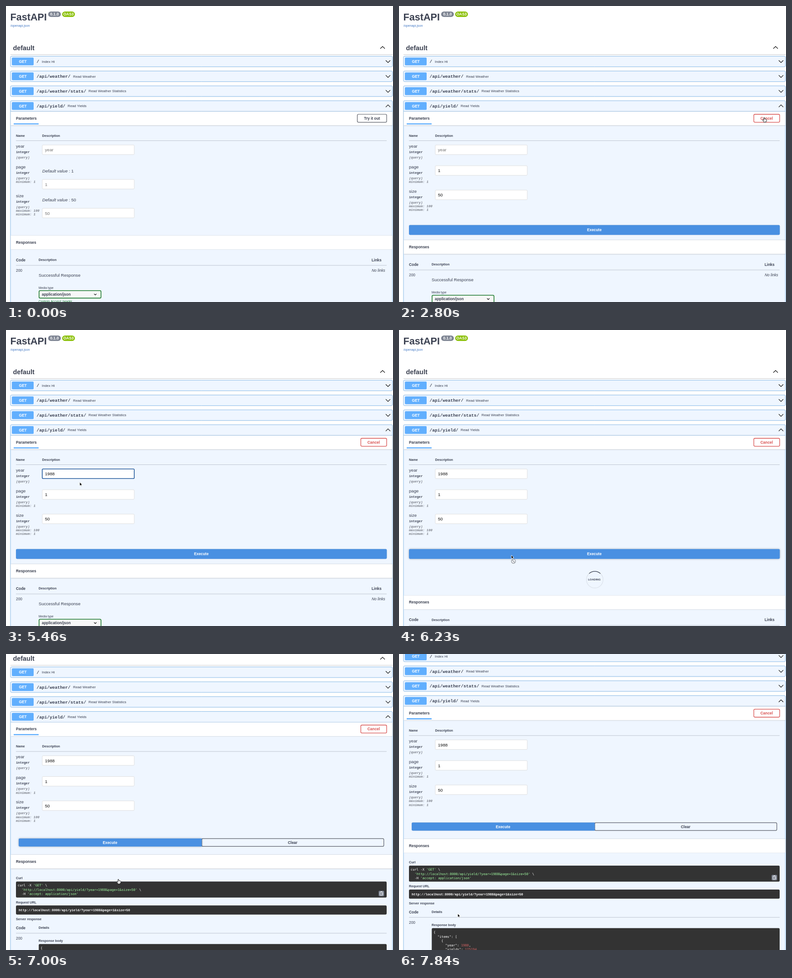
Recreate the animation shown at these times as an HTML page with a canvas. Size 854x656 px, loop 8 s.

```html
<!DOCTYPE html>
<html lang="en">
<head>
<meta charset="utf-8">
<title>API docs</title>
<style>
html, body { margin: 0; width: 100%; height: 100%; overflow: hidden; background: #fff; }
canvas { display: block; }
</style>
</head>
<body>
<canvas id="stage" width="854" height="656"></canvas>
<script>
const ctx = document.getElementById('stage').getContext('2d');
const LOOP = 8000, STEP = 70;
const INK = '#3b4151', BLUE = '#61affe', PANEL = '#eff6ff', DARK = '#333', GREEN = '#a2fca2';
const SANS = '"Liberation Sans", Arial, sans-serif';
const COURIER = '"Liberation Mono", "Courier New", monospace';
const CODE = '"DejaVu Sans Mono", Menlo, monospace';

// Moments at which the page changes
const TRY = 2520, FOCUS = 3710, LOADING = 6160, ANSWER = 6510;
const TYPED = [4270, 4480, 4620, 4970];
const CLICKS = [[1260, 1400], [2450, 2590], [3640, 3780], [6090, 6230]];

const SCROLL = [[6720, 0], [6790, .7], [6860, 22], [6930, 55], [7000, 82.5], [7070, 97],
  [7140, 106], [7280, 113.5], [7420, 116.5], [7560, 117.7]];
const POINTER = [[280, 420, 646], [420, 372, 470], [560, 318, 310], [700, 285, 226], [840, 276, 210],
  [1470, 276, 210], [1610, 360, 215], [1820, 591, 233.5], [2030, 770, 255], [2310, 806, 247],
  [3150, 806, 247], [3290, 690, 272], [3430, 400, 322], [3570, 190, 325], [3700, 149, 316],
  [5390, 149, 316], [5600, 190, 380], [5810, 238, 480], [6020, 248, 499],
  [7140, 248, 499], [7280, 210, 530], [7420, 150, 570], [7560, 131, 577], [7840, 129.5, 575.5]];
const SHAPES = [[0, 'none'], [280, 'arrow'], [770, 'hand'], [1900, 'arrow'], [2100, 'hand'],
  [3220, 'arrow'], [3570, 'beam'], [4200, 'none'], [5460, 'arrow'], [5880, 'hand'],
  [LOADING, 'ban'], [ANSWER, 'hand'], [7210, 'arrow']];

const between = (t, a, b) => t >= a && t < b;

function tween(keys, t) {
  const i = keys.findIndex(k => k[0] > t);
  if (i === 0) return keys[0].slice(1);
  if (i < 0) return keys[keys.length - 1].slice(1);
  const a = keys[i - 1], b = keys[i], p = (t - a[0]) / (b[0] - a[0]);
  return a.slice(1).map((v, j) => v + (b[j + 1] - v) * p);
}

// y is the middle of the capitals
function text(s, x, y, size = 8.4, { color = INK, style = '', family = SANS, align = 'left' } = {}) {
  ctx.font = `${style} ${size}px ${family}`;
  ctx.fillStyle = color;
  ctx.textAlign = align;
  ctx.fillText(s, x, y + size * .35);
}
const bold = (s, x, y, size, color, align) => text(s, x, y, size, { style: 'bold', color, align });
const courier = (s, x, y, size, color, style = 'bold') =>
  text(s, x, y, size, { style, color, family: COURIER });

function code(parts, x, y) {
  for (const [s, color] of parts) {
    text(s, x, y, 7.2, { color, family: CODE });
    x += ctx.measureText(s).width;
  }
}

function box(x, y, x2, y2, fill, stroke, width = 1, radius = 2, shadow = 0) {
  ctx.save();
  ctx.beginPath();
  ctx.roundRect(x, y, x2 - x, y2 - y, radius);
  ctx.shadowColor = 'rgba(0,0,0,.28)';
  ctx.shadowBlur = shadow;
  if (fill) { ctx.fillStyle = fill; ctx.fill(); }
  ctx.shadowBlur = 0;
  if (stroke) { ctx.strokeStyle = stroke; ctx.lineWidth = width; ctx.stroke(); }
  ctx.restore();
}

function path(points, stroke, width = 1, fill) {
  ctx.beginPath();
  points.forEach(([x, y]) => ctx.lineTo(x, y));
  if (fill) { ctx.closePath(); ctx.fillStyle = fill; ctx.fill(); }
  ctx.strokeStyle = stroke;
  ctx.lineWidth = width;
  ctx.stroke();
}

const rule = (y, x = 22, x2 = 840) => path([[x, y], [x2, y]], 'rgba(59,65,81,.35)', .8);
const chevron = (x, y, dir) => path([[x - 5, y - 2.5 * dir], [x, y + 2.5 * dir], [x + 5, y - 2.5 * dir]], '#111', 1.2);

function band(y, label) {
  box(10.5, y, 852.5, y + 30.5, '#fff', null, 0, 0, 2);
  bold(label, 22, y + 15);
}

function clipboard(x, y, h) {
  box(x, y, x + 12, y + h, '#7d8492', null, 0, 2);
  const m = y + h / 2;
  box(x + 3, m - 3.5, x + 9, m + 4, null, '#fff', .9, 1);
  box(x + 4.5, m - 4.5, x + 7.5, m - 2.5, '#fff', null, 0, .5);
  path([[x + 10, m + 1], [x + 5.5, m + 1], [x + 7, m - .5]], '#fff', .8);
}

function header() {
  bold('FastAPI', 9.5, 24, 21.6);
  box(93, 12.3, 121, 24.3, '#7d8492', null, 0, 6);
  bold('0.1.0', 107, 18.3, 8.6, '#fff', 'center');
  box(124, 12.3, 152, 24.3, '#89bf04', null, 0, 6);
  bold('OAS3', 138, 18.3, 8.4, '#fff', 'center');
  text('/openapi.json', 9.7, 43.3, 7.2, { color: '#4278c4' });
  bold('default', 15.5, 92.7, 14.4);
  chevron(831, 92, -1);
  rule(107.5, 10, 853);
}

function routes(t) {
  [['/', 'Index Hi', 79], ['/api/weather/', 'Read Weather', 148],
   ['/api/weather/stats/', 'Read Weather Statistics', 182], ['/api/yield/', 'Read Yields', 136]
  ].forEach(([url, label, x], i) => {
    const y = 111.3 + i * 32.9, open = i === 3, copy = open && between(t, 1540, 1890);
    box(10, y, 852.7, open ? 1000 : y + 23.3, PANEL, '#85bdf0', .9, 2.4, 2);
    box(13, y + 3, 61, y + 20.3, BLUE, null, 0, 2);
    bold('GET', 37, y + 11.7, 8.4, '#fff', 'center');
    courier(url, 67.5, y + 11.7, 9.6);
    text(label, x, y + 11.6, 7.8);
    chevron(copy ? 826 : 843, y + 11.7, open ? -1 : 1);
    if (copy) clipboard(835, y + 3, 15);
  });
}

function field(y, value, muted, focused) {
  box(80, y, 283, y + 21.3, '#fff', focused ? '#245a9c' : '#d9d9d9', focused ? 1.6 : .8);
  text(value, 86, y + 11, 9.6, { color: muted ? '#757575' : '#111' });
}

function param(name, y, limits) {
  text(name, 22, y - .5, 9.6);
  courier('integer', 22, y + 12.4, 7.2);
  ['(query)', ...limits].forEach((s, i) =>
    courier(s, 22, y + 24 + (i ? .2 + i * 8.3 : 0), 7.2, '#7b7f87', 'italic bold'));
}

function fallback(y, value) {
  text('Default value', 80, y, 9.6, { style: 'italic' });
  text(' : ' + value, 136, y, 9.6);
}

function parameters(t) {
  const edit = t >= TRY;
  path([[10, 233.8], [852.7, 233.8]], '#85bdf0', .9);
  band(234, 'Parameters');
  box(17, 260, 72, 262.6, BLUE, null, 0, 0);
  if (edit) {
    box(783, 240, 840, 257.7, '#fff', '#d9504f', 1.3, 2.4, 1);
    bold('Cancel', 811.3, 248.8, 8.4, '#d9504f', 'center');
  } else {
    box(775.3, 240, 840, 257.7, '#fff', '#5a5e68', 1.2, 2.4, between(t, 2170, TRY) ? 5 : 1);
    bold('Try it out', 807.7, 248.8, 8.4, INK, 'center');
  }
  bold('Name', 22, 287, 7.2);
  bold('Description', 79.7, 287, 7.2);
  rule(298.5);

  const typed = '1988'.slice(0, TYPED.filter(k => t >= k).length);
  param('year', 311, []);
  field(308, typed || 'year', !typed, between(t, FOCUS, 6090));
  param('page', 357, ['minimum: 1']);
  param('size', edit ? 411 : 421, ['maximum: 100', 'minimum: 1']);
  if (edit) {
    field(354, '1');
    field(408, '50');
  } else {
    fallback(366, 1);
    field(384.3, '1', true);
    fallback(430, 50);
    field(448.3, '50', true);
  }
}

function buttons(t) {
  if (t < TRY) return;
  const done = t >= ANSWER, shadow = between(t, 5880, 7630) ? 4 : 1;
  if (done) {
    box(432, 491.6, 833.7, 508.9, PANEL, '#5a5e68', 1.2, 2.4, 1);
    box(28, 491.2, 432, 509.2, '#4990e2', null, 0, [2.4, 0, 0, 2.4], shadow);
    bold('Execute', 229.5, 500.4, 8.4, '#fff', 'center');
    bold('Clear', 632.5, 500.4, 8.4, INK, 'center');
  } else {
    box(22, 485.6, 840.3, 507.2, '#4990e2', null, 0, 2.4, shadow);
    bold('Execute', 431, 496.3, 8.4, '#fff', 'center');
  }
}

function spinner(t) {
  const turn = (t - 6230) / 1000 * 2 * Math.PI - Math.PI / 2;
  ctx.lineWidth = 1.2;
  ctx.strokeStyle = 'rgba(85,85,85,.13)';
  ctx.beginPath();
  ctx.arc(432, 553.3, 18.4, 0, 7);
  ctx.stroke();
  ctx.strokeStyle = INK;
  ctx.beginPath();
  ctx.arc(432, 553.3, 18.4, turn - .75, turn + .75);
  ctx.stroke();
  bold('LOADING', 431, 552.6, 6, INK, 'center');
}

function schema(y) {
  band(y, 'Responses');
  bold('Code', 22, y + 54);
  bold('Description', 72, y + 53.8, 7.2);
  bold('Links', 806.7, y + 54);
  rule(y + 66);
  text('200', 22, y + 77.5);
  text('No links', 807, y + 77.5, 8.4, { style: 'italic' });
  text('Successful Response', 72, y + 88, 9.6);
  text('Media type', 72, y + 116, 6.7);
  box(73, y + 122, 209.6, y + 138.6, '#f7f7f7', '#1d7a2c', 1.6, 2.4, 1);
  bold('application/json', 79, y + 130.3);
  path([[194.4, y + 129], [197, y + 131.6], [199.6, y + 129]], '#111', 1.2);
  text('Controls', 72, y + 146, 6.7, { color: '#1d7a2c' });
  courier('Accept', 99, y + 146, 6.7, '#1d7a2c', '');
  text('header.', 125, y + 146, 6.7, { color: '#1d7a2c' });
}

function answer() {
  const url = 'http://localhost:8000/api/yield/?year=1988&page=1&size=50', white = '#fff';
  band(527.6, 'Responses');
  bold('Curl', 22, 579.4, 7.2);
  box(22, 586.8, 840, 622.3, DARK, null, 0, 2.4);
  code([['curl -X ', white], ["'GET'", GREEN], [' \\', white]], 25.8, 595.2);
  code([['  ', white], [`'${url}'`, GREEN], [' \\', white]], 25.8, 604.7);
  code([['  -H ', white], ["'accept: application/json'", GREEN]], 25.8, 614.2);
  clipboard(822.3, 607.3, 12);
  bold('Request URL', 22, 632.6, 7.2);
  box(22, 639.8, 840, 660, DARK, null, 0, 2.4);
  courier(url, 28, 650, 7.2, white);
  bold('Server response', 22, 670.2, 7.2);
  bold('Code', 22, 689.5);
  bold('Details', 72, 689.4, 7.2);
  rule(701.3);
  text('200', 22, 713);
  bold('Response body', 72, 718, 7.2);
  box(72.3, 725.3, 840, 1000, DARK, null, 0, 2.4);
  [['{'], ['  "items": ['], ['    {'], ['      "year": ', '1988', ','], ['      "yields": ', '175194', ',']]
    .forEach((parts, i) => code(parts.map((s, j) => [s, j === 1 ? '#d36363' : white]), 76.3, 734.2 + i * 9.5));
}

const draw = {
  none() {},
  arrow() {
    path([[0, 0], [0, 8], [1.9, 6.3], [3.1, 9], [4.4, 8.4], [3.2, 5.8], [5.6, 5.6]], '#fff', .9, '#000');
  },
  ban() {
    draw.arrow();
    ctx.lineWidth = 1.2;
    ctx.strokeStyle = '#8d9299';
    ctx.fillStyle = '#eef0f3';
    ctx.beginPath();
    ctx.arc(4.6, 13.5, 4.6, 0, 7);
    ctx.fill();
    ctx.stroke();
    path([[1.6, 10.5], [7.6, 16.5]], '#8d9299', 1.2);
  },
  hand() {
    path([[-1, .8], [0, 0], [.9, .8], [1, 3.6], [3, 3.7], [5, 4.5], [5.5, 5.6], [5, 8], [4, 9],
      [4, 10.5], [-1, 10.5], [-1.4, 9], [-3.8, 6.2], [-3.4, 5.2], [-2.4, 5.4], [-1, 6.6]], '#222', 1, '#fff');
    path([[1, 7], [1, 9]], '#555', .5);
    path([[2.7, 7], [2.7, 9]], '#555', .5);
  },
  beam() {
    path([[-1.8, -5], [0, -4.4], [1.8, -5]], '#222', .8);
    path([[0, -4.4], [0, 4.4]], '#222', .9);
    path([[-1.8, 5], [0, 4.4], [1.8, 5]], '#222', .8);
  }
};

function pointer(t) {
  const [x, y] = tween(POINTER, t), shape = SHAPES.filter(s => s[0] <= t).pop()[1];
  ctx.save();
  ctx.translate(x, y);
  ctx.lineJoin = 'round';
  if (CLICKS.some(([a, b]) => between(t, a, b))) {
    ctx.fillStyle = 'rgba(110,120,135,.22)';
    ctx.beginPath();
    ctx.arc(0, 0, 13, 0, 7);
    ctx.fill();
  }
  draw[shape]();
  ctx.restore();
}

function render(t) {
  ctx.fillStyle = '#fff';
  ctx.fillRect(0, 0, 854, 656);
  ctx.save();
  ctx.translate(0, -tween(SCROLL, t)[0]);
  header();
  routes(t);
  parameters(t);
  buttons(t);
  if (t >= ANSWER) answer();
  else {
    const busy = t >= LOADING;
    if (busy) spinner(t);
    schema(busy ? 588.5 : t >= TRY ? 519 : 508.8);
  }
  ctx.restore();
  pointer(t);
}

const start = performance.now();
function tick() {
  const t = (performance.now() - start) % LOOP;
  render(Math.min(Math.floor(t / STEP) * STEP, 7840));
  requestAnimationFrame(tick);
}
tick();
</script>
</body>
</html>
```
